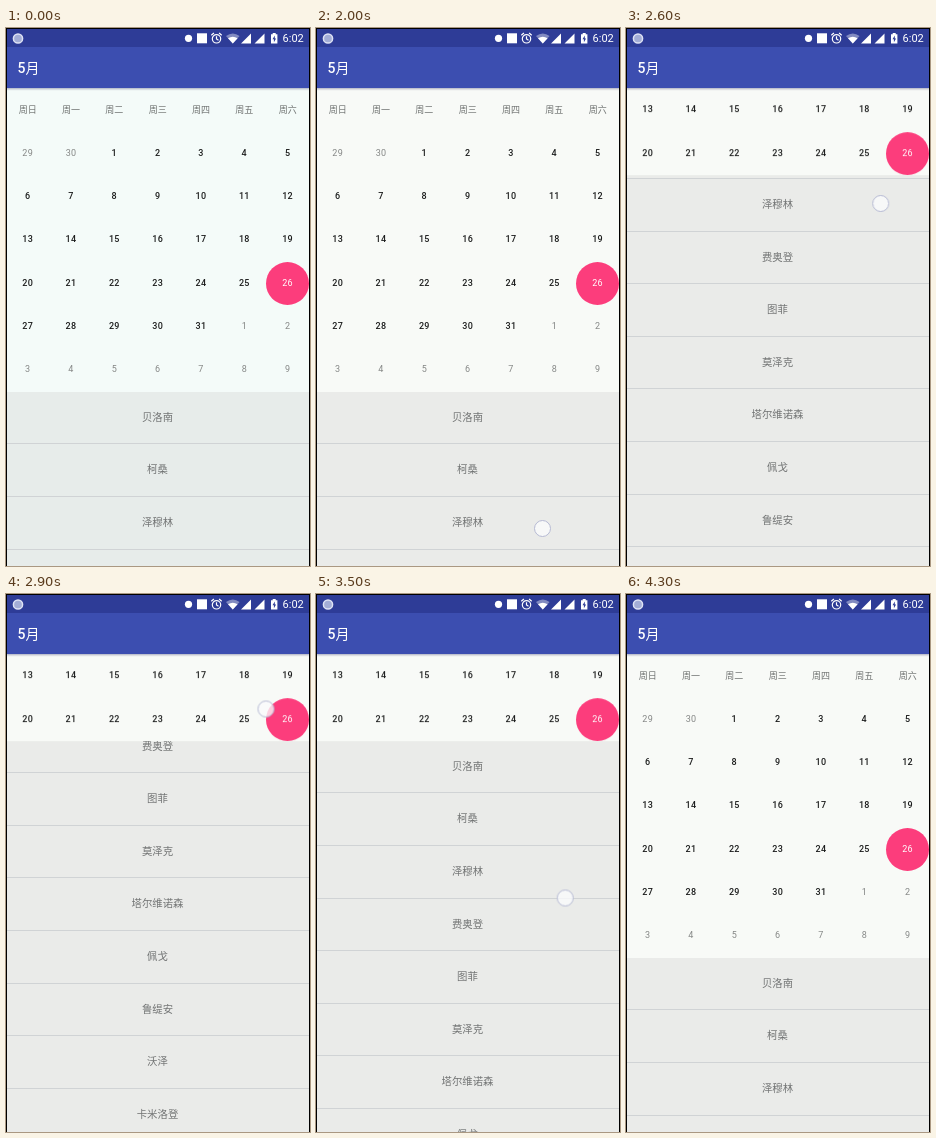
An HTML page that plays this animation: 304x538 px, repeating every 4.7 s.

```html
<!DOCTYPE html>
<html lang="zh-CN">
<head>
<meta charset="utf-8">
<title>Calendar</title>
<style>
  html, body { margin: 0; width: 100%; height: 100%; overflow: hidden; background: #000; }
  body { font-family: Roboto, "Noto Sans CJK SC", "Noto Sans CJK", sans-serif; }
  #stage { position: absolute; left: 0; top: 0; width: 304px; height: 538px; overflow: hidden; }
  #screen { position: absolute; left: 0; top: 0; width: 304px; height: 538px; background: #f8faf7; }
  #calendar {
    position: absolute; left: 0; top: 60.6px; width: 303.4px;
    display: grid; grid-template-columns: repeat(7, 43.34px); grid-auto-rows: 43.3px;
    font-size: 9px; letter-spacing: .3px; line-height: 43.3px; text-align: center; color: #848685;
  }
  #calendar .head { color: #6f7271; letter-spacing: 0; }
  #calendar .day { color: #1c1d1d; font-weight: 500; }
  #calendar .picked { color: #fff; background: #fc3d7c; border-radius: 50%; }
  #list { position: absolute; left: 0; top: 363.8px; width: 304px; height: 600px; overflow: hidden; background: #e9ebea; }
  #rows div {
    height: 51.6px; line-height: 51.6px; border-bottom: 1px solid #d0d3d5;
    text-align: center; font-size: 10.4px; color: #717373; text-indent: -1px;
  }
  #bar {
    position: absolute; left: 0; top: 19px; width: 304px; height: 41px; background: #3c4eb0;
    box-shadow: 0 1px 2px rgba(40, 45, 100, .4);
    color: #fff; font-size: 14px; font-weight: 500; line-height: 42px; text-indent: 11.5px;
  }
  #status { position: absolute; left: 0; top: 0; }
  #touch {
    position: absolute; left: -8.5px; top: -8.5px; width: 17px; height: 17px; box-sizing: border-box;
    border: 1px solid #b5b9d2; border-radius: 50%; background: rgba(250, 251, 252, .78);
  }
  #frame { position: absolute; inset: 0; border: solid #000; border-width: 1px 1px 0; }
</style>
</head>
<body>
<div id="stage">
  <div id="screen"></div>
  <div id="calendar"></div>
  <div id="list"><div id="rows"></div></div>
  <div id="bar">5月</div>
  <svg id="status" width="304" height="19" fill="#fff">
    <rect width="304" height="19" fill="#2e3c97"/>
    <circle cx="12" cy="10.5" r="4.6" fill="#a3add6" stroke="#dfe3f4" stroke-width="1.5"/>
    <circle cx="182.5" cy="10.3" r="3.6"/>
    <rect x="191" y="5.3" width="10" height="10"/>
    <g fill="none" stroke="#fff" stroke-width="1.2">
      <circle cx="210.5" cy="10.8" r="4.2"/>
      <path d="M210.5 8.2v2.8l2 1.2M205.3 7.2l2.6-2.2M215.7 7.2l-2.6-2.2"/>
    </g>
    <path d="M220 8q6.8-5 13.6 0L226.8 15.5z" opacity=".4"/>
    <path d="M222 10.2q4.8-3 9.6 0L226.8 15.5z"/>
    <path d="M235 15.5h10v-10zM248.5 15.5h10v-10z"/>
    <path d="M265 6.3h1.7v-1.2h3v1.2h1.7v9.2h-6.4z"/>
    <path d="M268.8 7.6l-2.3 3.7h1.4v3l2.2-3.8h-1.3z" fill="#2e3c97"/>
    <text x="276.6" y="14.3" font-size="11">6:02</text>
  </svg>
  <div id="touch"></div>
  <div id="frame"></div>
</div>
<script>
const LOOP = 4700, STEP = 100, DRAG_START = 2000, TURN = 2900;
const MAX_COLLAPSE = 216.8, MAX_SHIFT = 129.9;

const $ = id => document.getElementById(id);
const clamp = (v, lo, hi) => Math.min(hi, Math.max(lo, v));

function add(parent, text, className = '') {
  const el = document.createElement('div');
  el.textContent = text;
  el.className = className;
  parent.append(el);
}

for (const d of '日一二三四五六') add($('calendar'), '周' + d, 'head');
for (let i = 0; i < 42; i++) {
  const day = i - 1;
  if (day < 1) add($('calendar'), day + 30);
  else if (day > 31) add($('calendar'), day - 31);
  else add($('calendar'), day, day === 26 ? 'picked' : 'day');
}

const names = ['贝洛南', '柯桑', '泽穆林', '费奥登', '图菲', '莫泽克',
  '塔尔维诺森', '佩戈', '鲁缇安', '沃泽', '卡米洛登'];
names.forEach(name => add($('rows'), name));

// Finger height and total drag distance, one pair per step
const drag = [
  [500, 0], [440, 58], [381, 115], [321, 175], [265, 228], [215, 276], [175, 318],
  [146, 353], [125, 380], [114.5, 395], [116, 396], [132, 380], [163, 350], [205, 310],
  [254, 264], [303.5, 217], [350, 170], [396, 123], [443, 76], [488, 31], [510, 2]
];

const poses = [{ time: 0, total: 0, x: 226, y: 500, down: false }];
drag.forEach(([y, total], i) => {
  const time = DRAG_START + i * STEP;
  const x = 259.5 - (y - 114.5) * (time < TURN ? .087 : .057);
  poses.push({ time, total, x, y, down: true });
});
poses.push({ ...poses[0], time: DRAG_START + drag.length * STEP });
poses.push({ ...poses[0], time: LOOP });

// The calendar follows each drag delta until it reaches either end
let shift = 0, last = 0;
for (const p of poses) {
  p.collapse = Math.min(p.total, MAX_COLLAPSE);
  p.scroll = p.total - p.collapse;
  shift = clamp(shift + p.collapse - last, 0, MAX_SHIFT);
  last = p.collapse;
  p.shift = shift;
}

function play(id, frameOf) {
  const frames = poses.map(p => ({ offset: p.time / LOOP, easing: 'step-end', ...frameOf(p) }));
  $(id).animate(frames, { duration: LOOP, iterations: Infinity });
}

const moveUp = d => ({ transform: `translateY(${-d}px)` });
const tint = (early, late) => p => ({ backgroundColor: p.time < DRAG_START ? early : late });

play('calendar', p => moveUp(p.shift));
play('list', p => moveUp(p.collapse));
play('rows', p => moveUp(p.scroll));
play('touch', p => ({ transform: `translate(${p.x}px, ${p.y}px)`, opacity: p.down ? 1 : 0 }));
play('screen', tint('#f4fbf9', '#f8faf7'));
play('list', tint('#e7ecea', '#eaebe9'));
</script>
</body>
</html>
```
